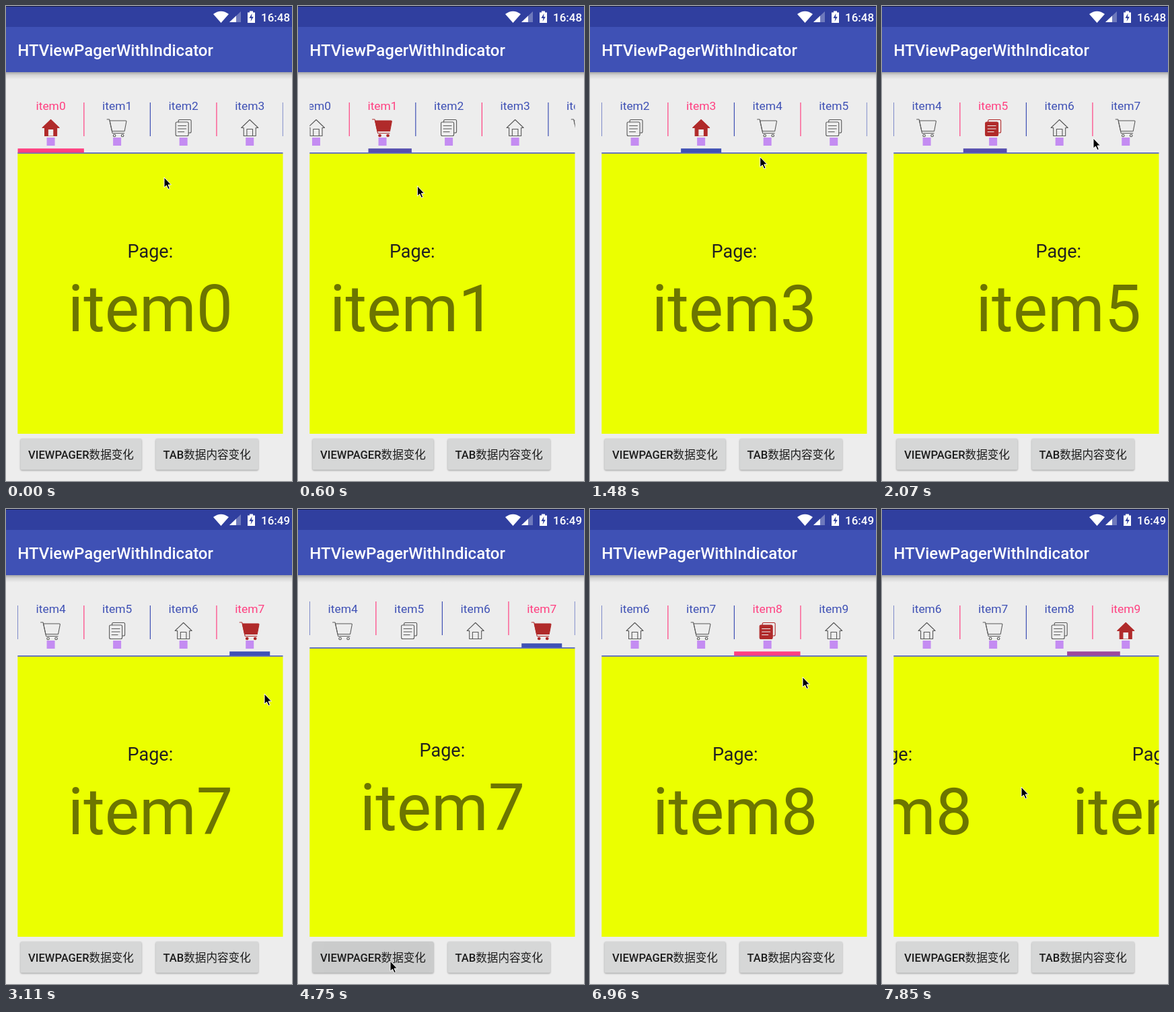
An HTML page for the animation above (8 s loop, 425 by 704 pixels).

```html
<!DOCTYPE html>
<html>
<head>
<meta charset="utf-8">
<style>
html, body { margin: 0; width: 100%; height: 100%; overflow: hidden; background: #ededed; }
svg { display: block; font-family: Roboto, "Noto Sans CJK SC", "Noto Sans CJK", sans-serif; }
.mid { text-anchor: middle; }
.bold { font-weight: 500; }
.label { font-size: 17.4px; fill: #3f51b5; }
.icon { fill: none; stroke: #585858; stroke-width: 1.1; stroke-linejoin: round; stroke-linecap: round; }
.on .label { fill: #ff4081; }
.on .icon { stroke: #b02a2a; }
.on .body { fill: #b02a2a; }
.on .mark { stroke: #ededed; }
.on .door { fill: #ededed; }
.button { fill: #d6d7d7; filter: drop-shadow(0 1px 1px #0005); }
</style>
</head>
<body>
<svg width="425" height="704" viewBox="0 0 425 704">
  <defs>
    <linearGradient id="shade" x2="0" y2="1">
      <stop stop-color="#000" stop-opacity=".3"/>
      <stop offset=".4" stop-color="#000" stop-opacity=".1"/>
      <stop offset="1" stop-color="#000" stop-opacity="0"/>
    </linearGradient>
    <clipPath id="pager"><rect x="17.3" y="130" width="394.2" height="504"/></clipPath>
    <clipPath id="pressed"><rect x="21.5" y="641" width="180" height="46.5" rx="2.5"/></clipPath>
  </defs>

  <rect width="425" height="704" fill="#ededed"/>
  <rect y="98" width="425" height="11" fill="url(#shade)"/>
  <rect width="425" height="98" fill="#3f51b5"/>
  <rect width="425" height="31" fill="#303f9f"/>
  <rect width="425" height="1" fill="#151a3c"/>
  <g fill="#fff">
    <path d="M308 12Q319.5 3.5 331 12L319.5 25Z"/>
    <path d="M332 24H349V8Z" opacity=".3"/>
    <path d="M332 24H342V14.5Z"/>
    <path d="M359 9.5H362V7.5H367V9.5H370V25H359Z"/>
    <path d="M365.5 11L361.5 18H364.5L363.500 23L367.8 16H365Z" fill="#303f9f"/>
    <text id="clock" class="bold" x="422" y="22.5" font-size="16.9" text-anchor="end"></text>
    <text class="bold" x="17.2" y="74" font-size="24">HTViewPagerWithIndicator</text>
  </g>

  <g clip-path="url(#pager)">
    <rect id="page" width="425" height="500" fill="#ebff00"/>
    <g id="pages"></g>
    <g id="tabs"></g>
    <rect id="line" width="425" height="1.5" fill="#3f51b5"/>
    <rect id="bar" height="6.2"/>
  </g>

  <rect class="button" x="21.5" y="641" width="180" height="46.5" rx="2.5"/>
  <rect class="button" x="222.5" y="641" width="152.5" height="46.5" rx="2.5"/>
  <g id="press" clip-path="url(#pressed)">
    <rect x="21" y="640" width="181" height="48" fill-opacity=".8"/>
    <circle id="ripple" cx="117" cy="665" fill-opacity=".6"/>
  </g>
  <g class="mid bold" font-size="16.6" fill="#1c1c1c">
    <text x="111.5" y="671">VIEWPAGER数据变化</text>
    <text x="298.7" y="671">TAB数据内容变化</text>
  </g>
  <path id="cursor" d="M0 0V15L3.5 12L6 17.500L8.4 16.5L6 11H10.5Z" stroke="#fff"/>
</svg>
<script>
const LOOP = 8000, TICKS = 54, LEFT = 17.3, TAB = 98.55, PAGE = 394.2, COUNT = 10;
const PINK = [255, 64, 129], BLUE = [63, 81, 181];
const $ = id => document.getElementById(id);
const set = (el, attrs) => { for (const k in attrs) el.setAttribute(k, attrs[k]); };
const mix = (a, b, f) => a + (b - a) * f;
const clamp = (v, lo, hi) => Math.min(hi, Math.max(lo, v));
const smooth = u => { u = clamp(u, 0, 1); return u * u * (3 - 2 * u); };

const icons = [
  `<path class="body" d="M-9 13.5H-12.5L0 1.5L12.5 13.5H9V25.5H-9Z"/>
   <path class="door" d="M-4.3 25.5V15.5H4.3V25.5"/>`,
  `<path d="M-15 1H-11.5L-7 21.5H10.5"/>
   <path class="body" d="M-11 3H12.5Q14 3 13.7 4.5L11 18.5H-7.6Z"/>
   <circle class="body" cx="-4" cy="25" r="1.8"/><circle class="body" cx="8" cy="25" r="1.8"/>`,
  `<path d="M-7.500 5V3.5Q-7.5 1.5 -5.5 1.5H9.5Q11.5 1.5 11.5 3.5V19Q11.5 21 9.5 21H7.5"/>
   <rect class="body" x="-11.5" y="5" width="19" height="20.5" rx="2"/>
   <path class="mark" d="M-8 10.5H4M-8 15H4M-8 19.5H1"/>`
];

for (let i = 0; i < COUNT; i++) {
  const x = LEFT + TAB * (i + .5);
  $('tabs').innerHTML += `<g>
    <text class="label mid" x="${x}" y="154">item${i}</text>
    <g class="icon" transform="translate(${x} 167)">${icons[i % 3]}</g>
    <rect class="badge" x="${x - 6}" y="195" width="12" height="12" fill="#c48cf2"/>
    <rect class="divider" x="${x + TAB / 2 - .6}" width="1.2" height="50"
      fill="${i % 2 ? '#3f51b5' : '#ff4081'}"/></g>`;
  $('pages').innerHTML += `<g class="mid" transform="translate(${LEFT + PAGE * (i + .5)})">
    <text y="373" font-size="27" fill="#212121">Page:</text>
    <text y="482" font-size="96.7" fill-opacity=".54">item${i}</text></g>`;
}
const tabs = [...$('tabs').children];

const SWIPE = 4, TAP = 1.2;
const moves = [
  { to: 1, mid: 2.5, span: SWIPE },
  { to: 2, mid: 5, span: SWIPE },
  { to: 3, mid: 7.52, span: SWIPE },
  { to: 5, mid: 13.58, span: TAP },
  { to: 7, mid: 19.58, span: TAP },
  { to: 8, mid: 46.44, span: TAP },
  { to: 9, mid: 52.96, span: SWIPE }
];
const MINUTE = 16, CLICK = 30, DRAG = 38;

// Pointer stops: tick, x, y.
const stops = [[0, 235, 254], [7, 140, 275], [12, 314, 196], [14, 314, 196], [19, 362, 182],
  [21, 384, 274], [28, 137, 670], [32, 137, 670], [38, 345, 205], [43, 165, 195],
  [46, 264, 188], [47, 316, 249], [50, 325, 546], [53, 207, 412]];

function pointer(t) {
  const n = stops.findLastIndex(s => s[0] <= t), a = stops[n], b = stops[n + 1] || a;
  const f = smooth((t - a[0]) / (b[0] - a[0] || 1));
  return `translate(${mix(a[1], b[1], f)} ${mix(a[2], b[2], f)})`;
}

// A tab is chosen early in a move, and the strip then runs ahead of the page.
function pagerAt(t) {
  const strip = page => clamp(page - 1, 0, 4);
  let page = 0, selected = 0, scroll = 2 * smooth((t - DRAG) / 5), from = 0;
  for (const { to, mid, span } of moves) {
    const done = smooth((t - mid) / span + .5);
    page += (to - from) * done;
    scroll += (strip(to) - strip(from)) * smooth(done / .36);
    if (done > .3) selected = to;
    from = to;
  }
  return { page, selected, scroll };
}

function draw(t) {
  const { page, selected, scroll } = pagerAt(t);
  const age = t - CLICK, compact = age >= 2 && age < 6, lift = compact ? 12 : 0;
  const items = age < 2 ? 8 : COUNT;

  $('clock').textContent = t < MINUTE ? '16:48' : '16:49';
  set($('tabs'), { transform: `translate(${-TAB * scroll})` });
  tabs.forEach((tab, i) => {
    tab.classList.toggle('on', i === selected);
    set(tab.querySelector('.badge'), { visibility: compact ? 'hidden' : 'visible' });
    set(tab.querySelector('.divider'), {
      y: 143 - lift / 2,
      visibility: i < items - 1 ? 'visible' : 'hidden'
    });
  });

  set($('pages'), { transform: `translate(${-PAGE * page} ${-lift / 2})` });
  set($('page'), { y: 218.7 - lift });
  set($('line'), { y: 217.2 - lift });

  // Even pages have a wide pink bar, odd pages a short blue one.
  const odd = 1 - Math.abs(1 - page % 2), width = mix(TAB, 60, odd);
  set($('bar'), {
    x: LEFT + TAB * (page + .5 - scroll) - width / 2, y: 211.2 - lift, width,
    fill: `rgb(${PINK.map((v, i) => Math.round(mix(v, BLUE[i], odd)))})`
  });

  set($('press'), { opacity: age > 0 ? Math.max(0, .1 - age / 50) : 0 });
  set($('ripple'), { r: Math.max(0, 40.5 * age) });
  set($('cursor'), { transform: pointer(t) });
}

const start = performance.now();
function frame() {
  const now = (performance.now() - start) % LOOP;
  draw(Math.floor((now + 9) * TICKS / LOOP) % TICKS);
  requestAnimationFrame(frame);
}
frame();
</script>
</body>
</html>
```
